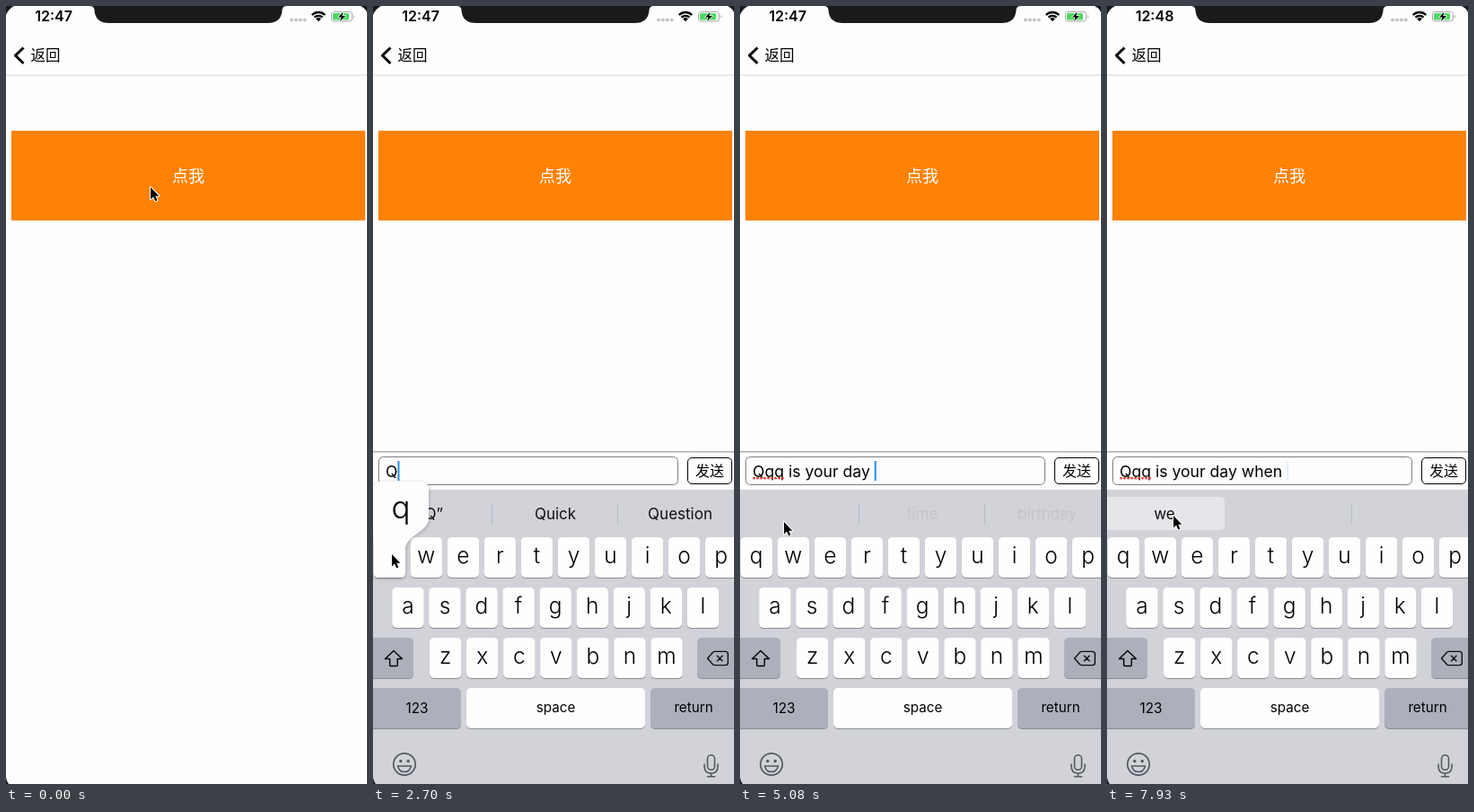
An HTML page with a canvas for the animation above (7.99 s loop, 402 by 867 pixels).

```html
<!DOCTYPE html>
<html lang="zh-CN">
<head>
<meta charset="utf-8">
<title>Input bar</title>
<style>
html, body { margin: 0; width: 100%; height: 100%; overflow: hidden; background: #fefefe; }
canvas { display: block; width: 402px; height: 867px; }
</style>
</head>
<body>
<canvas id="stage"></canvas>
<script>
const W = 402, H = 867, LOOP = 7990;
const canvas = document.getElementById('stage');
const ctx = canvas.getContext('2d');
const ratio = window.devicePixelRatio || 1;
canvas.width = W * ratio;
canvas.height = H * ratio;

const FAMILY = 'Inter, "Noto Sans CJK SC", "Noto Sans CJK", sans-serif';
const KEY_GREY = '#abb0ba', ICON = '#55585e', BOARD = '#d1d3d9';
const CELL_X = [64, 203, 342];

// Each timeline holds [start, value]; the latest started entry is valid.
const typed = [[0, ''], [2330, 'Q'], [2820, 'Qq'], [3060, 'Qqq'], [3700, 'Qqq '],
  [4130, 'Qqq is '], [4400, 'Qqq is your '], [4960, 'Qqq is your day '],
  [6200, 'Qqq is your day w'], [7320, 'Qqq is your day when ']];
const popups = [[0, ''], [2240, 'Q'], [2420, ''], [2700, 'q'], [2880, ''],
  [3000, 'q'], [3120, ''], [6110, 'w'], [6270, '']];
const suggestions = [[0, []], [2420, ['“Q”', 'Quick', 'Question']],
  [2880, ['“Qq”', 'Www', 'Question']], [3120, ['“Qqq”', 'Www', 'Question']],
  [3700, []], [3820, ['is', 'and', 'was']], [4130, []],
  [4270, ['your', 'a', 'the']], [4400, []], [4850, ['day', 'time', 'birthday']],
  [4960, ['', 'time', 'birthday']], [6270, ['“w”', 'when', 'we']], [7320, []],
  [7500, ['we', 'you', 'I']], [7930, ['we']]];
const pressedCell = [[0, -1], [3520, 0], [3640, -1], [4060, 0], [4130, -1], [4330, 0],
  [4400, -1], [4900, 0], [4960, -1], [7240, 1], [7320, -1], [7840, 0]];
const fades = [[0, 1], [4960, .5], [5020, .25], [5080, .07], [6270, 1]];
const pointer = [[0, 161, 202], [1150, 161, 202], [1370, 115, 316], [1540, 85, 525],
  [1720, 85, 525], [2200, 21, 611], [3120, 21, 611], [3440, 69, 562], [3640, 69, 562],
  [4270, 50, 578], [4330, 50, 578], [4680, 49, 575], [5610, 49, 575], [5940, 63, 635],
  [6390, 59, 612], [6450, 59, 612], [6750, 170, 572], [7320, 170, 572], [7780, 74, 568]];

const at = (line, t) => line.findLast(entry => entry[0] <= t)[1];
const clamp = v => Math.max(0, Math.min(1, v));

function pointerAt(t) {
  const next = pointer.findIndex(p => p[0] > t);
  if (next < 0) return pointer.at(-1).slice(1);
  const [t0, x0, y0] = pointer[next - 1], [t1, x1, y1] = pointer[next];
  const k = (t - t0) / (t1 - t0);
  return [x0 + (x1 - x0) * k, y0 + (y1 - y0) * k];
}

function label(text, x, y, size, color = '#000', align = 'center', weight = 400) {
  ctx.font = `${weight} ${size}px ${FAMILY}`;
  ctx.textAlign = align;
  ctx.fillStyle = color;
  ctx.fillText(text, x, y);
}

function rect(x, y, w, h, color) {
  ctx.fillStyle = color;
  ctx.fillRect(x, y, w, h);
}

function round(x, y, w, h, r, fill, stroke, width = 1) {
  ctx.beginPath();
  ctx.roundRect(x, y, w, h, r);
  if (fill) { ctx.fillStyle = fill; ctx.fill(); }
  if (stroke) { ctx.strokeStyle = stroke; ctx.lineWidth = width; ctx.stroke(); }
}

function shape(d, fill, stroke, width = 1) {
  const path = new Path2D(d);
  ctx.lineJoin = 'round';
  if (stroke) { ctx.strokeStyle = stroke; ctx.lineWidth = width; ctx.stroke(path); }
  if (fill) { ctx.fillStyle = fill; ctx.fill(path); }
}

function dot(x, y, r, color) {
  ctx.beginPath();
  ctx.arc(x, y, r, 0, 7);
  ctx.fillStyle = color;
  ctx.fill();
}

function drawPage(t) {
  rect(0, 0, W, H, '#fefefe');
  label(t < 6570 ? '12:47' : '12:48', 53, 17.3, 16, '#000', 'center', 600);
  for (let i = 0; i < 4; i++) dot(318 + i * 4.9, 15.5, 2, '#c6c6c8');

  ctx.strokeStyle = '#000';
  for (const [r, width] of [[10.2, 2.4], [6.4, 2.3], [2, 4]]) {
    ctx.beginPath();
    ctx.arc(348, 17.2, r, -Math.PI * .75, -Math.PI * .25);
    ctx.lineWidth = width;
    ctx.stroke();
  }
  round(362.5, 6.5, 23, 10.5, 3, null, '#a5a5a7');
  round(364, 8, 18, 7.5, 1.5, '#4cd964');
  shape('M387 10 q2 1.7 0 3.6z', '#a5a5a7');
  shape('M375.5 6.5 L370 12.4 H373.4 L372 17 L378 10.9 H374.4Z', '#000', '#fff', 1.4);

  shape('M19.5 46.5 L10.5 55.2 L19.5 64', null, '#000', 3);
  label('返回', 27.5, 61.2, 16.5, '#000', 'left');
  rect(0, 76.5, W, 1.2, '#dededf');
  rect(6, 139, 394, 100, '#ff8205');
  label('点我', 203, 195.7, 18, '#fff');
}

function drawInput(t, text) {
  rect(0, 496, W, 43, '#fefefe');
  rect(0, 496, W, 1.5, '#b0b0b2');
  round(6.5, 502.5, 333, 31, 5, '#fefefe', '#7d7d7f');
  const sendColor = text ? '#000' : '#cbcbcb';
  round(350.5, 503.5, 49, 29, 4.5, null, sendColor);
  label('发送', 375, 524, 16, sendColor);

  const selected = t >= 3640 && t < 3700;
  if (selected) rect(11, 506, 41, 25, '#cde3f8');
  if (text) label(text, 14, 524.5, 17.6, '#000', 'left');
  else label('请输入...', 19, 524.5, 18, '#808082', 'left');
  if (t >= 3760) for (let i = 0; i < 9; i++) dot(15.6 + i * 4, 526.2, 1.4, '#ee4438');

  if (!selected) {
    ctx.font = `400 17.6px ${FAMILY}`;
    const x = 14 + ctx.measureText(text).width;
    ctx.globalAlpha = t < 7840 ? 1 : t < 7930 ? .5 : .12;
    rect(x, 507, 2, 22, '#2b8be6');
    ctx.globalAlpha = 1;
  }
}

function drawSuggestions(t) {
  const pressed = at(pressedCell, t);
  if (pressed !== 0) rect(132, 554, 1, 24, '#b9bcc3');
  if (pressed !== 1) rect(272, 554, 1, 24, '#b9bcc3');
  if (pressed >= 0) round([-5, 133, 273][pressed], 547, [136, 139, 134][pressed], 37, 5, '#e5e6ea');
  const fading = t >= 3640 && t < 3700;
  at(suggestions, t).forEach((word, i) => {
    ctx.globalAlpha = fading && i < 2 ? .65 : at(fades, t);
    label(word, CELL_X[i], 572, 17, '#111');
  });
  ctx.globalAlpha = 1;
}

function key(x, y, w, color = '#fefefe') {
  round(x, y + 1, w, 45, 5, '#898c92');
  round(x, y, w, 45, 5, color);
}

function drawKeys(upper, active) {
  const rows = [['qwertyuiop', .5, 592], ['asdfghjkl', 21.2, 648], ['zxcvbnm', 63, 704]];
  for (const [letters, left, y] of rows) {
    [...letters].forEach((letter, i) => {
      const x = left + i * 41.05;
      key(x, y, 35.5);
      if (upper) label(letter.toUpperCase(), x + 17.7, y + 30, 22);
      else label(letter, x + 17.7, y + 29, 24.5, '#000', 'center', 300);
    });
  }
  key(-4, 704, 49, upper ? '#fefefe' : KEY_GREY);
  shape('M23 718.5 L32.5 727.5 H27.3 V734.5 Q27.3 735.5 26.3 735.5 H19.7 Q18.7 735.5 18.7 734.5 V727.5 H13.5Z',
    upper ? '#000' : null, '#000', 1.4);
  key(361, 704, 49, KEY_GREY);
  shape('M372.5 727 L378.5 720.3 Q379.4 719.4 380.6 719.4 H392.5 Q395.3 719.4 395.3 722.2 V731.8 Q395.3 734.6 392.5 734.6 H380.6 Q379.4 734.6 378.5 733.7Z M383 723.8 L389.4 730.2 M389.4 723.8 L383 730.2',
    null, '#111', 1.4);

  key(-4, 760, 102, KEY_GREY);
  label('123', 49, 788, 15.3);
  key(104, 760, 199);
  label('space', 203.5, 787, 15.2);
  key(309, 760, 101, KEY_GREY);
  label('return', 357, 787, 15.2, active ? '#000' : '#7b7f88');

  ctx.lineCap = 'round';
  ctx.beginPath();
  ctx.arc(35, 845, 12.2, 0, 7);
  ctx.strokeStyle = ICON;
  ctx.lineWidth = 1.7;
  ctx.stroke();
  dot(30.8, 841.5, 1.7, ICON);
  dot(39.2, 841.5, 1.7, ICON);
  shape('M27.5 847 H42.5 Q41 853.5 35 853.5 Q29 853.5 27.5 847Z', null, ICON, 1.5);
  round(372.5, 834.8, 8, 16.5, 4, null, ICON, 1.6);
  shape('M369 845 V847.5 Q369 855 376.5 855 Q384 855 384 847.5 V845 M376.5 855 V858.7 M372.5 858.7 H380.5', null, ICON, 1.6);
  ctx.lineCap = 'butt';
}

function drawPopup(letter) {
  if (!letter) return;
  const isW = letter === 'w';
  const left = isW ? 41.5 : .5, right = left + 35.5;
  const outerLeft = isW ? 28 : 0, outerRight = isW ? 91 : 62;
  ctx.save();
  ctx.shadowColor = 'rgba(0,0,0,.25)';
  ctx.shadowBlur = 4 * ratio;
  ctx.shadowOffsetY = ratio;
  shape(`M${outerLeft + 9} 530 H${outerRight - 9} Q${outerRight} 530 ${outerRight} 539 V571
    C${outerRight} 586 ${right} 590 ${right} 606 V632 Q${right} 637 ${right - 5} 637
    H${left + 5} Q${left} 637 ${left} 632 V606
    C${left} 590 ${outerLeft} 586 ${outerLeft} 571 V539 Q${outerLeft} 530 ${outerLeft + 9} 530Z`, '#fefefe');
  ctx.restore();
  label(letter, (outerLeft + outerRight) / 2, 571, 35, '#000', 'center', 300);
}

function drawBezel() {
  const black = '#1a1a1b';
  shape('M93 0 Q98.5 0 98.5 5 Q99.5 19 115 19 H291 Q306.5 19 307.5 5 Q307.5 0 313 0Z', black);
  shape('M0 0 H9 Q3 3 0 10Z M402 0 H395 Q400 2.5 402 7Z M0 860 Q1 864.5 3 867 H0Z', black);
}

function drawPointer(t) {
  const [x, y] = pointerAt(t);
  ctx.save();
  ctx.translate(x, y);
  shape('M0 0 V13.4 L3.1 10.6 L5.3 15.4 L7.4 14.4 L5.3 9.7 H9.4Z', '#000', '#fff', 2);
  ctx.restore();
}

function draw(t) {
  ctx.setTransform(ratio, 0, 0, ratio, 0, 0);
  drawPage(t);
  if (t >= 840) {
    const text = at(typed, t);
    const slide = 371 * (1 - clamp((t - 800) / 420)) ** 3;
    ctx.save();
    ctx.translate(0, slide);
    drawInput(t, text);
    rect(0, 539, W, 328, BOARD);
    drawSuggestions(t);
    drawKeys(!text, !!text);
    drawPopup(at(popups, t));
    ctx.restore();
  }
  drawBezel();
  drawPointer(t);
}

const start = performance.now();
function tick() {
  draw((performance.now() - start) % LOOP);
  requestAnimationFrame(tick);
}
tick();
</script>
</body>
</html>
```
